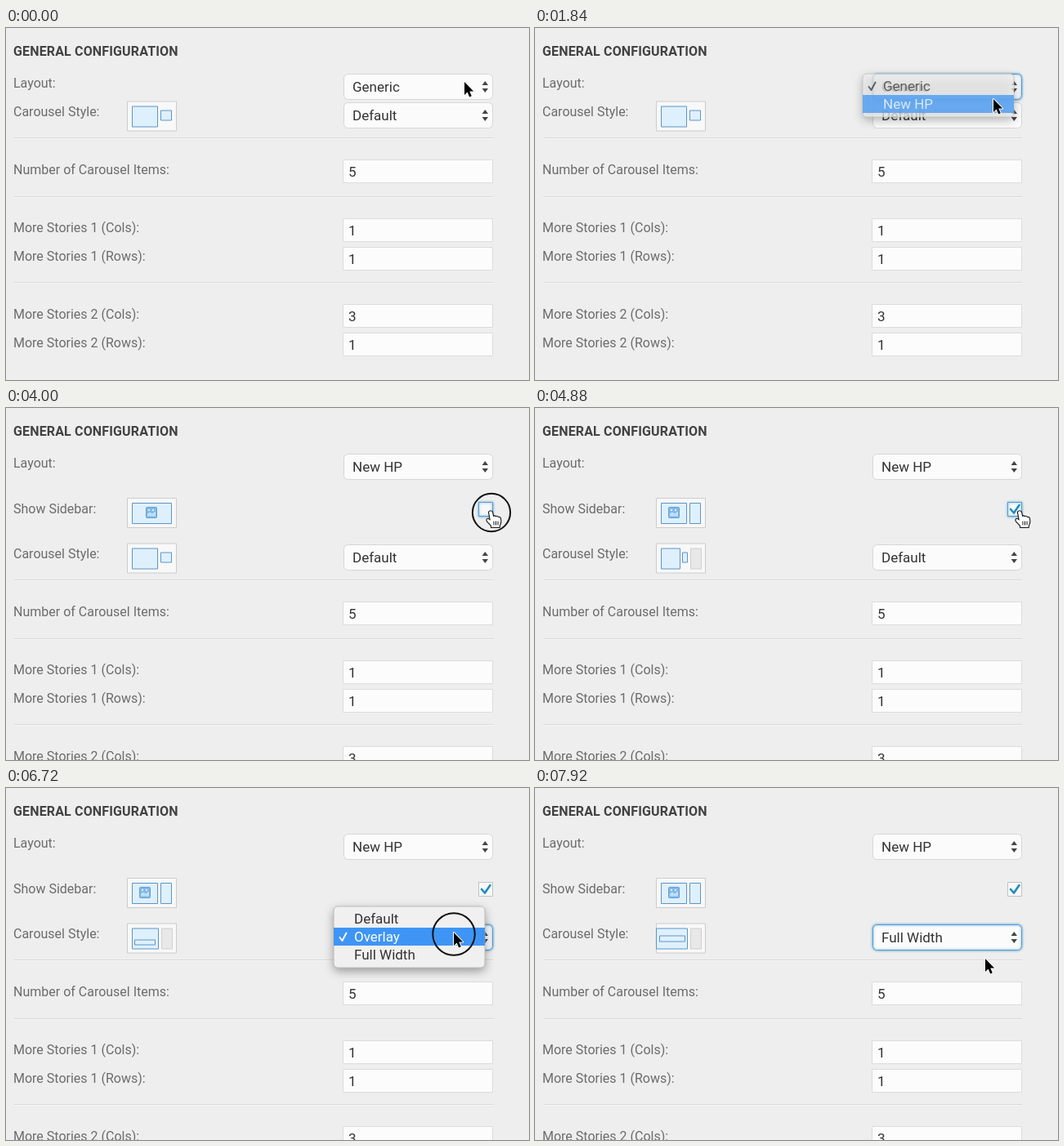
Recreate the animation shown at these times as an HTML page with a canvas. Size 640 by 431 pixels, loop 8 s.

```html
<!DOCTYPE html>
<html lang="en">
<head>
<meta charset="utf-8">
<title>General configuration</title>
<style>
  html, body { margin: 0; width: 100%; height: 100%; overflow: hidden; background: #eee; }
  canvas { display: block; width: 640px; height: 431px; }
</style>
</head>
<body>
<canvas id="stage"></canvas>
<script>
const LOOP = 8000, BLUE = '#5b9dd9', ROW = 22, FADE = 160;
const canvas = document.getElementById('stage');
const ctx = canvas.getContext('2d');
const ratio = window.devicePixelRatio || 1;
canvas.width = 640 * ratio;
canvas.height = 431 * ratio;

const layouts = ['Generic', 'New HP'];
const styles = ['Default', 'Overlay', 'Full Width'];
const menus = [
  { open: 480, close: 1800, top: 56, items: layouts, checked: 0 },
  { open: 5360, close: 5800, top: 167, items: styles, checked: 0 },
  { open: 6600, close: 7420, top: 145, items: styles, checked: 1 }
];
const toggles = [3300, 3900, 4500];
const clicks = [...menus.map(m => m.open), ...toggles];

// Pointer path: time, x, y
const path = [
  [0, 561, 66], [900, 561, 66], [1250, 561, 87], [2200, 561, 87],
  [2880, 575, 106], [3200, 594, 126], [4920, 594, 126], [5280, 571, 185],
  [5480, 571, 185], [5660, 571, 199], [6000, 571, 199], [6480, 548, 177],
  [6900, 548, 177], [7200, 549, 203], [7560, 549, 203], [7860, 551, 209], [LOOP, 551, 209]
];

function pointerAt(t) {
  const i = path.findIndex(p => p[0] > t);
  const a = path[i - 1], b = path[i];
  const u = (t - a[0]) / (b[0] - a[0]), k = u * u * (3 - 2 * u);
  return { x: a[1] + (b[1] - a[1]) * k, y: a[2] + (b[2] - a[2]) * k };
}

function text(str, x, y, color = '#6c6c6c', font = '16px') {
  ctx.font = `${font} Roboto, Inter, sans-serif`;
  ctx.fillStyle = color;
  ctx.fillText(str, x, y);
}

function box(x, y, w, h, fill, stroke, r = 0) {
  ctx.beginPath();
  ctx.roundRect(x + .5, y + .5, w, h, r);
  ctx.fillStyle = fill;
  ctx.fill();
  if (!stroke) return;
  ctx.strokeStyle = stroke;
  ctx.lineWidth = 1;
  ctx.stroke();
}

function shape(d, x, y, fill, stroke, width = 1) {
  const p = new Path2D(d);
  ctx.save();
  ctx.translate(x, y);
  ctx.lineJoin = ctx.lineCap = 'round';
  ctx.lineWidth = width;
  if (stroke) { ctx.strokeStyle = stroke; ctx.stroke(p); }
  if (fill) { ctx.fillStyle = fill; ctx.fill(p); }
  ctx.restore();
}

function glowing(focused, draw) {
  ctx.save();
  if (focused) { ctx.shadowColor = 'rgba(30,140,190,.8)'; ctx.shadowBlur = 3 * ratio; }
  draw(focused ? BLUE : null);
  ctx.restore();
}

function divider(y) {
  ctx.fillStyle = '#d8d8d8';
  ctx.fillRect(10, y - 1, 586, 1);
  ctx.fillStyle = '#f7f7f7';
  ctx.fillRect(10, y, 586, 1);
}

function field(label, value, labelY, top) {
  text(label, 9, labelY);
  box(412, top, 183, 28, '#fcfcfc', '#dcdcdc');
  text(value, 419, top + 21, '#333', '17px');
}

function select(value, top, focused) {
  glowing(focused, edge => box(413, top, 182, 31, '#fbfbfb', edge || '#d6d6d6', 5));
  text(value, 424, top + 22, '#333', '17px');
  shape('M0 5L3.7 0L7.4 5ZM0 9L3.7 14L7.4 9Z', 582.6, top + 9, '#444');
}

const blueBox = (x, y, w, h) => box(x, y, w, h, '#dff0fd', '#5a96c6');

function frame(y) { box(148, y, 60, 36, '#f8f8f8', '#ccc'); }

function sidebarIcon(on) {
  frame(110);
  blueBox(154, 116, on ? 31 : 48, 25);
  if (on) blueBox(189, 116, 13, 25);
  const x = on ? 163 : 171;
  box(x, 121, 13, 13, '#83b9e6', '#659fd0', 1);
  shape('M2 11V8L5 6L8 8L12 5V11Z', x, 121.5, '#bfe0f8');
  shape('M3 3h2v2h-2zM8 3h2v2h-2z', x, 121, '#dff0fd');
}

function styleIcon(style, sidebar, top) {
  frame(top);
  const y = top + 6;
  if (style === 0) {
    blueBox(154, y, sidebar ? 23 : 31, 25);
    if (sidebar) blueBox(180, y + 5, 6, 12);
    else blueBox(189, y + 5, 13, 12);
  } else if (style === 1) {
    blueBox(154, y, 32, 25);
    blueBox(157, y + 14, 25, 6);
  } else {
    blueBox(148, y, 38, 25);
    blueBox(152, y + 9, 31, 7);
  }
  if (sidebar) box(190, y, 13, 25, '#e8e8e8', '#cfcfcf');
}

function checkbox(on, focused) {
  glowing(focused, edge => box(578, 115, 17, 17, '#f8f8f8', edge || '#bfc3c7'));
  if (on) shape('M0 5L4 9.5L10.5 0', 582, 119, null, '#1e8cbe', 2.6);
}

function menu(m, t, pointer) {
  if (t < m.open || t >= m.close + FADE) return;
  const blink = t >= m.close - 80 && t < m.close;
  const hover = blink ? -1 : Math.floor((pointer.y - m.top - 4) / ROW);
  ctx.save();
  ctx.globalAlpha = Math.min(1, 1 - (t - m.close) / FADE);
  ctx.save();
  ctx.shadowColor = 'rgba(0,0,0,.38)';
  ctx.shadowBlur = 12 * ratio;
  ctx.shadowOffsetY = 4 * ratio;
  box(400.5, m.top - .5, 185, m.items.length * ROW + 9, '#f0f0f0', null, 5);
  ctx.restore();
  ctx.strokeStyle = '#bdbdbd';
  ctx.lineWidth = 1;
  ctx.stroke();
  m.items.forEach((item, i) => {
    const y = m.top + 4 + i * ROW, color = i === hover ? '#fff' : '#333';
    if (i === hover) {
      ctx.fillStyle = '#3e95f5';
      ctx.fillRect(401, y, 185, ROW);
    }
    text(item, 426, y + 17, color, '17px');
    if (i === m.checked) shape('M0 5.5L3 9.5L8 0', 408.5, y + 6.5, null, color, 1.9);
  });
  ctx.restore();
}

function cursor({ x, y }) {
  if (x >= 578 && x <= 596 && y >= 115 && y <= 133) {
    shape('M-2 1.5Q0-1 2 1.5L3.2 7Q5 5.8 6.2 7.2Q8 6.2 9.2 8Q11.4 7.4 12 9.5L12.4 13Q12 16 10.8 18V20H1V18L-4.2 12.4Q-5.2 10.2-3.2 9.8L-.2 11.8Z',
      x - 1, y, '#fff', '#111', 2.2);
    shape('M4 13V17M6.5 13V17M9 13V17', x - 1, y, null, '#111', 1);
  } else {
    shape('M0 0V16L3.6 12.6L6.2 18.4L8.8 17.2L6.3 11.6H11.2Z', x, y, '#000', '#fff', 2);
  }
}

function ring(t, { x, y }) {
  const start = clicks.find(c => t >= c && t < c + 200);
  if (start === undefined) return;
  ctx.beginPath();
  ctx.arc(x, y + 2, 10 + 26 * (t - start) / 200, 0, 7);
  ctx.strokeStyle = '#111';
  ctx.lineWidth = 2;
  ctx.stroke();
}

function draw(t) {
  const pointer = pointerAt(t);
  const done = menus.map(m => t >= m.close + FADE);
  const layout = +done[0], style = done[1] + done[2];
  const sidebar = toggles.filter(c => t >= c).length % 2 === 1;
  const focus = t < menus[0].open ? '' : t < toggles[0] ? 'layout' : t < menus[1].open ? 'check' : 'style';
  const shift = layout * 76;

  ctx.setTransform(ratio, 0, 0, ratio, 0, 0);
  ctx.fillStyle = '#eee';
  ctx.fillRect(0, 0, 640, 431);
  ctx.letterSpacing = '0.15px';
  text('GENERAL CONFIGURATION', 9, 34, '#424242', '600 16px');
  ctx.letterSpacing = '0px';

  text('Layout:', 9, 73);
  select(layouts[layout], 56, focus === 'layout');
  if (layout) {
    text('Show Sidebar:', 9, 129);
    sidebarIcon(sidebar);
    checkbox(sidebar, focus === 'check');
  }

  ctx.save();
  ctx.translate(0, shift);
  text('Carousel Style:', 9, 108);
  styleIcon(style, sidebar, 89.5);
  select(styles[style], 91, focus === 'style');
  [135, 207, 312].forEach(divider);
  field('Number of Carousel Items:', '5', 179, 161);
  field('More Stories 1 (Cols):', '1', 250, 233);
  field('More Stories 1 (Rows):', '1', 285, 268);
  field('More Stories 2 (Cols):', '3', 356, 338);
  field('More Stories 2 (Rows):', '1', 391, 373);
  ctx.restore();

  menus.forEach(m => menu(m, t, pointer));
  ring(t, pointer);
  cursor(pointer);
}

const began = performance.now();
function tick() {
  draw((performance.now() - began) % LOOP);
  requestAnimationFrame(tick);
}
tick();
</script>
</body>
</html>
```
